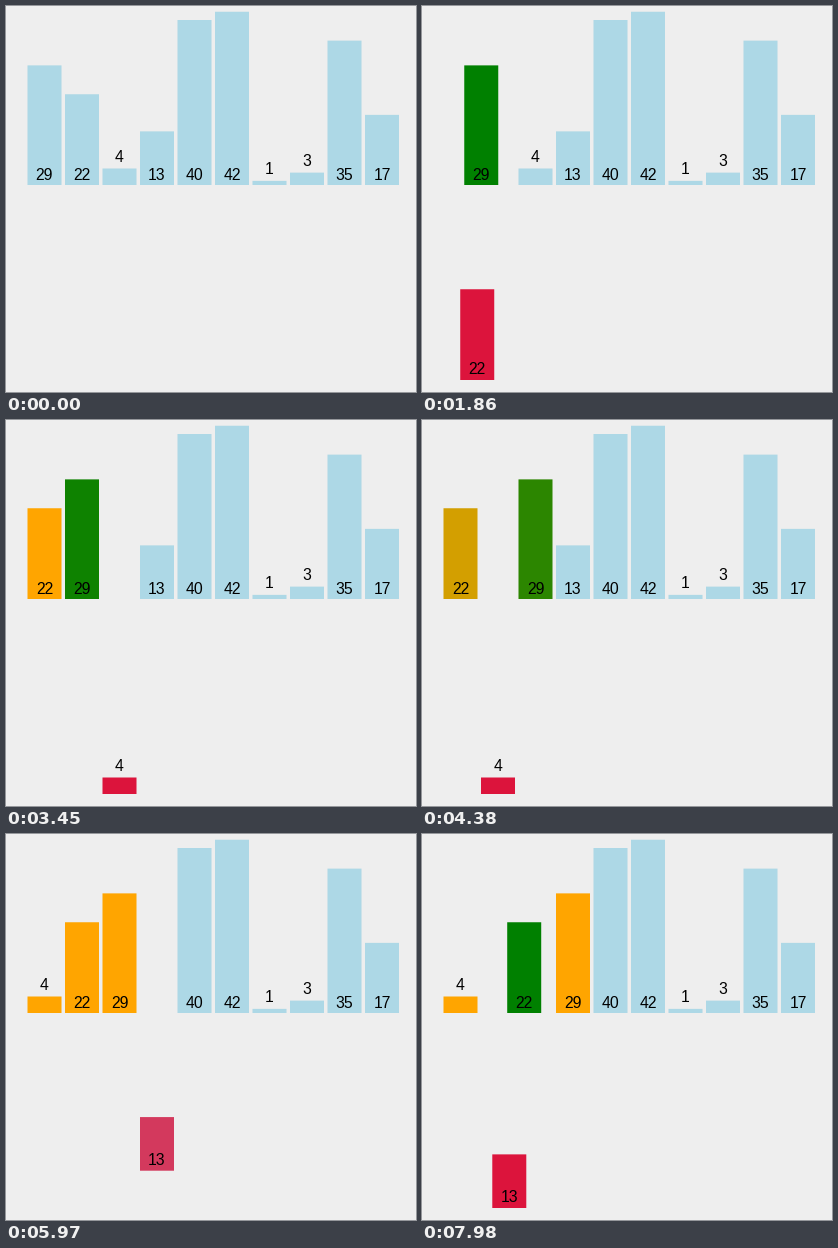
These frames come from a looping animation (410 px wide and 386 px high, 8000 ms). A matplotlib script:

```python
import numpy as np
import matplotlib.pyplot as plt
from matplotlib.animation import FuncAnimation
from matplotlib.colors import to_rgb
from matplotlib.patches import Rectangle

W, H, DPI = 410, 386, 64
LOOP, STEP = 8000, 20
TICK = 30                      # the picture is refreshed on this grid (ms)
DURATION = 270                 # length of one transition (ms)
STARTS = [185, 715, 1225, 1720, 2230, 2740, 3245, 3753,
          4285, 4773, 5288, 5798, 6306, 6810, 7336, 7824]

VALUES = [29, 22, 4, 13, 40, 42, 1, 3, 35, 17]
LEFT, PITCH, BAR_W, UNIT = 21.5, 37.5, 34, 4.125
UPPER, LOWER = 179, 374        # base lines of the two rows
IDLE, SORTED, COMPARED, KEY = map(
    to_rgb, ("lightblue", "orange", "green", "crimson"))


def sort_states(values):
    """Insertion sort; yields an array of (x, base, r, g, b) rows per step."""
    n = len(values)
    slot, base, color = list(range(n)), [UPPER] * n, [IDLE] * n
    order = list(range(n))

    def snapshot():
        return np.array([(LEFT + PITCH * s, b, *c)
                         for s, b, c in zip(slot, base, color)])

    yield snapshot()
    color[0] = SORTED
    yield snapshot()
    for i in range(1, n):
        key = order[i]
        base[key], color[key] = LOWER, KEY
        yield snapshot()
        j, previous = i, None
        while j > 0 and values[order[j - 1]] > values[key]:
            other = order[j - 1]
            if previous is not None:
                color[previous] = SORTED
            color[other] = COMPARED
            yield snapshot()
            order[j - 1], order[j] = key, other
            slot[key], slot[other] = j - 1, j
            yield snapshot()
            previous, j = other, j - 1
        base[key], color[key] = UPPER, SORTED
        if previous is not None:
            color[previous] = SORTED
        yield snapshot()


def ease(p):
    """Cubic in-out."""
    p = min(max(p, 0), 1)
    return 4 * p**3 if p < 0.5 else 1 - 4 * (1 - p)**3


STATES = list(sort_states(VALUES))


def state_at(t):
    k = int(np.searchsorted(STARTS, t, side="right"))
    if k == 0:
        return STATES[0]
    e = ease((t - STARTS[k - 1]) / DURATION)
    return STATES[k - 1] * (1 - e) + STATES[k] * e


plt.rcParams["font.family"] = "Liberation Sans"
fig = plt.figure(figsize=(W / DPI, H / DPI), dpi=DPI, facecolor="#eeeeee")
ax = fig.add_axes([0, 0, 1, 1])
ax.set(xlim=(0, W), ylim=(H, 0))
ax.axis("off")

bars, labels = [], []
for value in VALUES:
    bars.append(ax.add_patch(
        Rectangle((0, 0), BAR_W, -value * UNIT, lw=0, snap=False)))
    labels.append(ax.text(0, 0, str(value), ha="center", va="baseline",
                          fontsize=15.8 * 72 / DPI, color="black", zorder=3))


def draw(i):
    t = (i * STEP + STEP // 2) // TICK * TICK
    for value, bar, label, row in zip(VALUES, bars, labels, state_at(t)):
        x, base = row[:2]
        height = value * UNIT
        bar.set_xy((x, base))
        bar.set_facecolor(row[2:])
        # short bars carry their number on top
        lift = 5.5 if height > 30 else height + 6.5
        label.set_position((x + BAR_W / 2, base - lift))
    return bars + labels


anim = FuncAnimation(fig, draw, frames=LOOP // STEP, interval=STEP,
                     init_func=lambda: draw(0), repeat=True)
plt.show()
```
